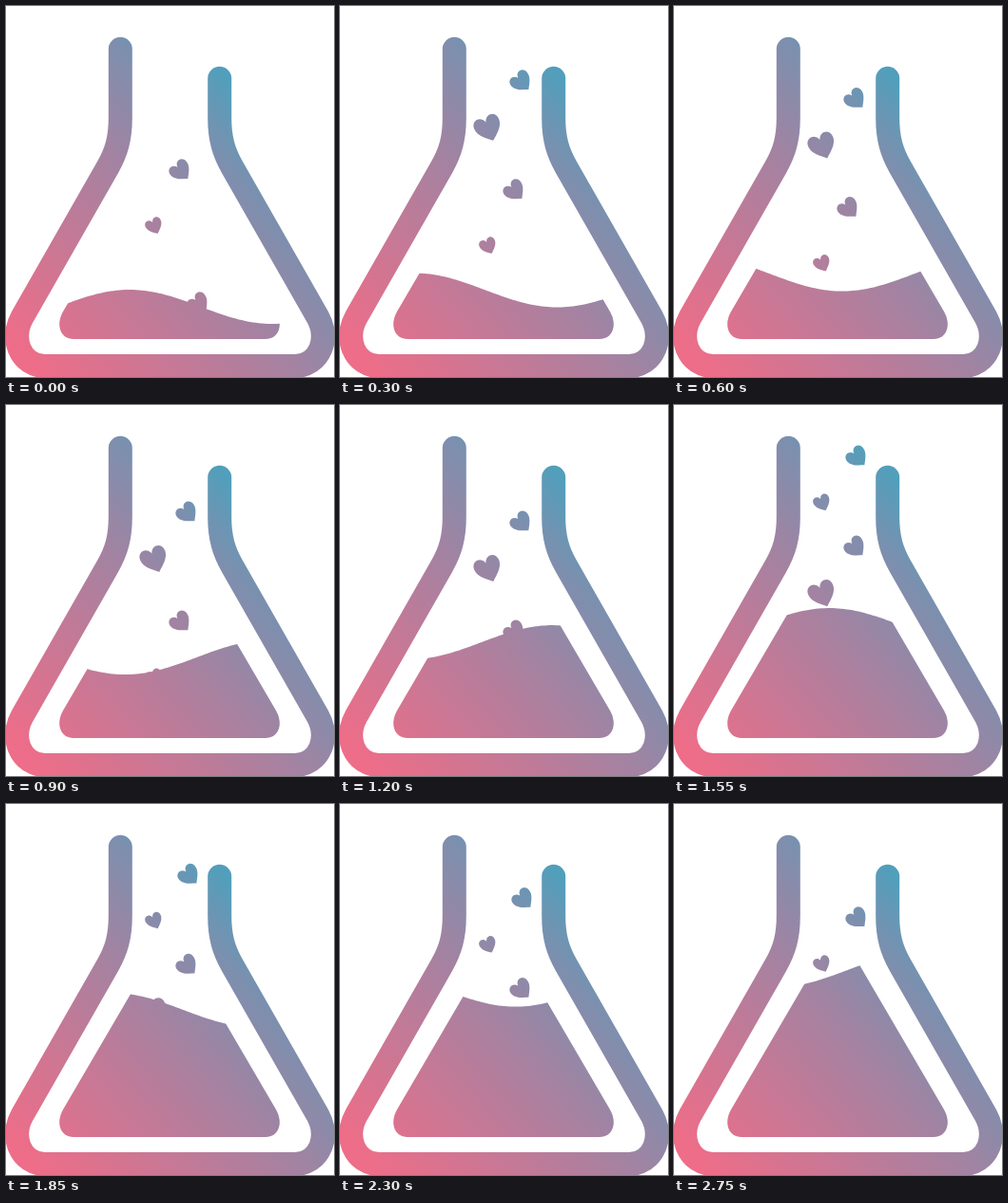
Animation, 345 px wide and 391 px high, one loop 2900 ms. Source, as an HTML page with a canvas:

```html
<!DOCTYPE html>
<html lang="en">
<head>
<meta charset="utf-8">
<title>Flask of hearts</title>
<style>
  html, body { margin: 0; width: 100%; height: 100%; overflow: hidden; background: #fff; }
  canvas { display: block; }
</style>
</head>
<body>
<canvas id="stage" width="345" height="391"></canvas>
<script>
const LOOP = 2900, STEP = 150, SHORT_STEP_END = 1550;
const ctx = document.getElementById('stage').getContext('2d');

const paint = ctx.createLinearGradient(0, 348, 354, 38);
paint.addColorStop(0, '#ee6d88');
paint.addColorStop(.45, '#a283a2');
paint.addColorStop(.62, '#7d8fae');
paint.addColorStop(.75, '#519fbb');

const flask = new Path2D(`M120.3 45.3V118C120.3 140 116 154 107 170L17 328
  C11 339 10 350 14 361C19 373 29 379.5 41 379.5H304C316 379.5 326 373 331 361
  C335 350 334 339 328 328L238 170C229 154 224.7 140 224.7 118V76.3`);
const vessel = new Path2D('M172 130L60 322C52 336 57 351 71 351H273C287 351 292 336 284 322Z');

const small = { x: 156, size: 17.5, tilt: -25 };
const medium = { x: 191, size: 22, tilt: -42 };
const large = { x: 156, size: 28, tilt: -22 };
const hearts = [
  { ...medium, x: 193, offset: -93, born: 1350 },
  { ...small, offset: -45, born: 1350 },
  { ...medium, offset: 2, born: STEP },
  { ...large, offset: 51, born: STEP },
  { ...medium, x: 184, offset: 117, born: 0 },
  { ...small, offset: 175, born: 0 },
  { ...medium, x: 203, offset: 257, born: 0 }
];

// Every half loop the hearts drop by 84 px, quickly at first and then slowing.
function fall(t) {
  const drops = (t - 1200) / (LOOP / 2);
  const whole = Math.floor(drops);
  return 122 + 84 * (whole + 1 - (1 - drops + whole) ** 1.35);
}

// The level rises ever more slowly while a wave travels left.
function surface(x, t) {
  const level = 317 - .059 * t + 2.7e-6 * t * t;
  const crest = 130 - .172 * t;
  return level - 18 * Math.cos((x - crest) * Math.PI / 150);
}

function drawLiquid(t) {
  ctx.save();
  ctx.clip(vessel);
  ctx.beginPath();
  ctx.moveTo(50, 360);
  for (let x = 50; x <= 295; x += 3) ctx.lineTo(x, surface(x, t));
  ctx.lineTo(295, 360);
  ctx.fill();
  ctx.restore();
}

function drawHeart({ x, size, tilt, offset, born }, t) {
  const y = fall(t) + offset;
  if (t < born || y > 320) return;
  ctx.save();
  ctx.translate(x, y);
  ctx.rotate(tilt * Math.PI / 180);
  ctx.scale(size, size);
  ctx.beginPath();
  ctx.moveTo(0, .5);
  ctx.bezierCurveTo(-.2, .33, -.5, .12, -.5, -.17);
  ctx.bezierCurveTo(-.5, -.52, -.1, -.56, 0, -.25);
  ctx.bezierCurveTo(.1, -.56, .5, -.52, .5, -.17);
  ctx.bezierCurveTo(.5, .12, .2, .33, 0, .5);
  ctx.restore(); // fill untransformed so the gradient stays fixed to the stage
  ctx.fill();
}

function poseTime(t) {
  const start = t < SHORT_STEP_END ? 0 : SHORT_STEP_END;
  return start + Math.floor((t - start) / STEP) * STEP;
}

function draw() {
  const t = poseTime(performance.now() % LOOP);
  ctx.clearRect(0, 0, 345, 391);
  ctx.fillStyle = ctx.strokeStyle = paint;
  ctx.lineWidth = 25;
  ctx.lineCap = 'round';
  ctx.stroke(flask);
  drawLiquid(t);
  hearts.forEach(heart => drawHeart(heart, t));
  requestAnimationFrame(draw);
}
draw();
</script>
</body>
</html>
```
